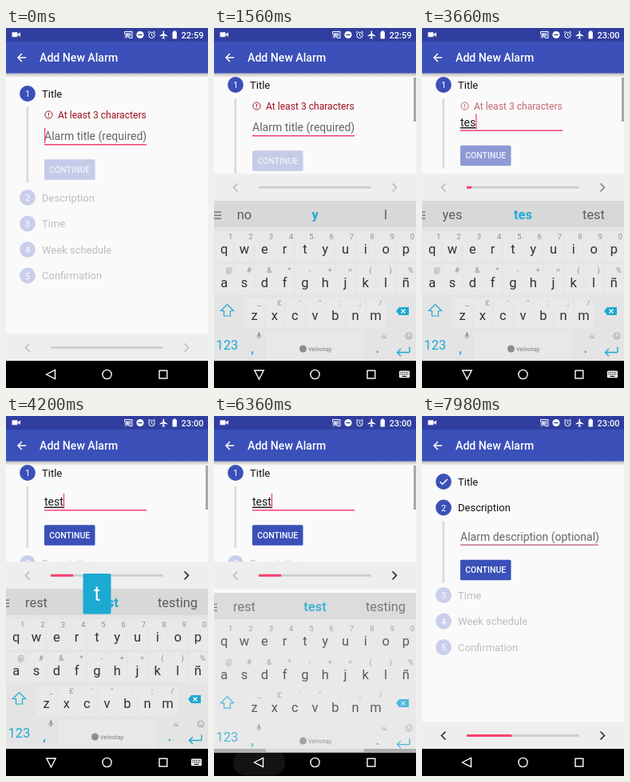
Recreate the animation shown at these times as an HTML page with a canvas. Size 253 by 450 pixels, loop 8000 ms.

```html
<!DOCTYPE html>
<html lang="en">
<head>
<meta charset="utf-8">
<title>Add New Alarm</title>
<style>
html, body { margin: 0; overflow: hidden; background: #000; }
canvas { display: block; }
</style>
</head>
<body>
<canvas id="stage" width="253" height="450"></canvas>
<script>
const ctx = document.getElementById('stage').getContext('2d');
const BLUE = '#3b50b8', PINK = '#f73f6e', CYAN = '#1ca9d2', RED = '#a00f1e', PAGE = '#fafafa';
const LOOP = 8000;

// Typed text and suggestions, from the given time on.
const typing = [
  { at: 0, text: '', hints: ['no', 'y', 'I'] },
  { at: 2520, text: 't', hints: ['the', 't', 'to'] },
  { at: 3060, text: 'te', hints: ['the', 'te', 'team'] },
  { at: 3540, text: 'tes', hints: ['yes', 'tes', 'test'] },
  { at: 4140, text: 'test', hints: ['rest', 'test', 'testing'] },
];
// Key popups: letter, key centre, top, start, end.
const popups = [
  ['t', 114, 197, 2400, 2580], ['e', 63.5, 197, 2940, 3120],
  ['s', 38, 238, 3420, 3600], ['t', 114, 197, 4020, 4260],
];
const steps = ['Title', 'Description', 'Time', 'Week schedule', 'Confirmation'];

const lerp = (a, b, k) => a + (b - a) * k;
const ramp = (t, a, b) => Math.min(1, Math.max(0, (t - a) / (b - a)));
const ease = (t, a, b) => { const k = ramp(t, a, b); return k * k * (3 - 2 * k); };

function rect(x, y, w, h, color, radius = 0) {
  ctx.fillStyle = color;
  ctx.beginPath();
  ctx.roundRect(x, y, w, h, radius);
  ctx.fill();
}
function disc(x, y, r, color) {
  ctx.fillStyle = color;
  ctx.beginPath();
  ctx.arc(x, y, r, 0, 7);
  ctx.fill();
}
function ring(x, y, r, color, width) {
  ctx.strokeStyle = color;
  ctx.lineWidth = width;
  ctx.beginPath();
  ctx.arc(x, y, r, 0, 7);
  ctx.stroke();
}
// Path data drawn at (x, y): stroked with a width, otherwise filled.
function path(d, x, y, color, width, angle = 0) {
  ctx.save();
  ctx.translate(x, y);
  ctx.rotate(angle);
  ctx.fillStyle = ctx.strokeStyle = color;
  ctx.lineWidth = width;
  if (width) ctx.stroke(new Path2D(d)); else ctx.fill(new Path2D(d));
  ctx.restore();
}
function text(s, x, y, size, color, align = 'left', weight = 400) {
  ctx.font = `${weight} ${size}px Roboto, sans-serif`;
  ctx.textAlign = align;
  ctx.fillStyle = color;
  ctx.fillText(s, x, y);
}
function layer(alpha, draw) {
  if (alpha <= 0) return;
  ctx.save();
  ctx.globalAlpha *= alpha;
  draw();
  ctx.restore();
}
function clipped(x, y, w, h, draw) {
  ctx.save();
  ctx.beginPath();
  ctx.rect(x, y, w, h);
  ctx.clip();
  draw();
  ctx.restore();
}

function statusBar(t) {
  rect(0, 0, 253, 17, '#303f9f');
  rect(7.5, 5.2, 7, 6, '#fff', .8);
  path('M0 0L4 -2.8V2.8Z', 14, 8.2, '#fff');
  rect(150, 6, 6.5, 5, 'rgba(255,255,255,.6)');
  path('M-4.5 -1.5V-4H5V4H1M-4.5 3.8h1M-4.5 1.2q2.6 0 2.8 2.8M-4.5 -.8q4.6 0 4.8 4.8', 153, 8.5, '#fff', 1);
  disc(168, 8.5, 4.6, '#fff');
  rect(165.4, 7.8, 5.2, 1.4, '#303f9f');
  ring(182.5, 9, 3.7, '#fff', 1);
  path('M0 -2V.4L1.7 1.4M-4.6 -3.2L-2.4 -5M4.6 -3.2L2.4 -5', 182.5, 9, '#fff', 1);
  path('M-.8 -4.5Q0 -5.5 .8 -4.5V-1.5L4.7 1V2.2L.8 1V3.5L2 4.5V5.3L0 4.7L-2 5.3V4.5L-.8 3.5V1L-4.7 2.2V1L-.8 -1.5Z', 197.3, 8.4, '#fff');
  rect(208.5, 4.5, 5.4, 9, '#fff', .6);
  rect(210, 3.4, 2.4, 1.5, '#fff');
  text(t < 2400 ? '22:59' : '23:00', 247.5, 12.5, 11, '#fff', 'right', 500);
}

function appBar() {
  const shade = ctx.createLinearGradient(0, 56, 0, 62);
  shade.addColorStop(0, 'rgba(0,0,0,.28)');
  shade.addColorStop(1, 'rgba(0,0,0,0)');
  rect(0, 56, 253, 6, shade);
  rect(0, 17, 253, 39.5, BLUE);
  path('M5.3 0H-5M0 -5L-5 0L0 5', 20, 37, '#fff', 1.5);
  text('Add New Alarm', 42, 42, 14.1, '#fff', 'left', 500);
}

function header(i, y, active, done) {
  layer(lerp(.26, 1, active), () => {
    disc(27, y, 9.9, BLUE);
    text(steps[i], 45, y + 4.5, 13, '#111');
  });
  if (done) path('M-4.5 .3L-1.4 3.3L4.8 -3', 27, y, '#fff', 1.5);
  else text(i + 1, 27, y + 4, 11, '#fff', 'center');
}

function button(y, enabled, press = 0) {
  layer(lerp(.28, 1, enabled), () => rect(48, y - 12.8, 63.5, 25.5, BLUE, 1.5));
  if (press > 0 && press < 1) clipped(48, y - 12.8, 63.5, 25.5, () =>
    disc(80, y, 40 * press, `rgba(255,255,255,${.35 * (1 - press)})`));
  text('CONTINUE', 79.7, y + 3.8, 10.5, `rgba(255,255,255,${lerp(.75, 1, enabled)})`, 'center', 500);
}

function titleForm(y, t, error, typed) {
  layer(error, () => {
    ring(53.5, y + 26.5, 4.6, RED, 1);
    rect(53, y + 24, 1, 3.2, RED);
    rect(53, y + 28.2, 1, 1, RED);
    text('At least 3 characters', 65, y + 31, 12.1, RED);
  });
  const base = y + 41 + 17 * error;
  ctx.font = '400 14px Roboto, sans-serif';
  const width = ctx.measureText(typed.text).width;
  if (typed.text) {
    text(typed.text, 48, base, 14, '#1c1c1c');
    rect(48, base + 1.5, width, 1.4, '#1c1c1c');
  } else text('Alarm title (required)', 48, base, 14, '#666');
  const caret = typed.text
    ? t > 6300 || Math.max(0, t - typed.at - 80) % 1000 < 500
    : t < 180 || (t > 720 && t < 1200);
  if (caret) rect(48 + width, base - 15, 1.3, 19, PINK);
  rect(48, base + 5, 128, 1.4, PINK);
  button(y + 78 + 17 * error, 1 - error, ramp(t, 6840, 7050));
}

function descriptionForm(y) {
  text('Alarm description (optional)', 48, y + 41, 14, '#666');
  rect(48, y + 46, 173, 1.3, '#b9587d');
  button(y + 78, 1);
}

function scrollbarAlpha(t) {
  if (t < 2300) return ease(t, 1320, 1440) - ramp(t, 2040, 2160);
  if (t < 5700) return ramp(t, 2520, 2580) - ramp(t, 4920, 5100);
  return t < 6450 ? ramp(t, 6150, 6210) : 0;
}

function stepper(t, bottom, typed) {
  const error = 1 - ease(t, 3560, 3800);
  const next = ease(t, 6880, 7160);
  const scroll = t < 6450 ? 11 * ease(t, 1260, 1440) : 0;
  clipped(0, 56, 253, bottom - 56, () => {
    let y = 82 - scroll;
    steps.forEach((_, i) => {
      const open = i === 0 ? 1 - next : i === 1 ? next : 0;
      const extra = i === 0 ? 17 * error : 0;
      const gap = lerp(32.5, (i === 0 ? 113 : 109.5) + extra, open);
      header(i, y, i === 0 ? 1 : open, i === 0 && t > 6900);
      if (open) clipped(0, y + 14, 253, Math.max(0, gap - 25), () => layer(open, () => {
        rect(25.3, y + 17, 3, 77 + extra, '#dcdcdc');
        if (i === 0) titleForm(y, t, error, typed);
        else descriptionForm(y);
      }));
      y += gap;
    });
    layer(scrollbarAlpha(t), () => rect(250, 62, 3, 55, '#a8a8a8'));
  });

  rect(0, bottom, 253, 34, '#eeeeee');
  const mid = bottom + 17;
  const arrow = (x, side, on) => path(`M${-2.5 * side} -5L${2.5 * side} 0L${-2.5 * side} 5`,
    x, mid, `rgba(50,50,50,${lerp(.25, 1, on)})`, 1.7);
  arrow(27, -1, next);
  arrow(226, 1, 1 - error);
  rect(56, mid - 1.5, 141, 3, '#cfcfcf');
  rect(56, mid - 1.5, 141 * .2 * (ease(t, 3560, 3900) + next), 3, PINK);
}

function keyRow(letters, hints, x, y, hintX, hintY) {
  [...letters].forEach((letter, i) => {
    const cx = x + 25.3 * i;
    rect(cx - 12, y - 23, 24, 38, '#e9e9e9', 2);
    text(letter, cx, y + 5, 16.5, '#303030', 'center');
    text(hints[i], cx + hintX, hintY + 3.5, 9.5, '#8d8d8d', 'center');
  });
}

function keyboard(hints) {
  rect(0, 216, 253, 200, '#e4e4e4');
  rect(0, 216, 253, 33, '#d8d8d8');
  for (const y of [229.5, 233.5, 237.5]) rect(0, y, hints[1] === 'y' ? 9 : 4, 1.3, '#666');
  text(hints[0], 38, 238.5, 16.4, '#5c5c5c', 'center');
  text(hints[1], 126.5, 238.5, 16.4, CYAN, 'center', 700);
  text(hints[2], 215, 238.5, 16.4, '#5c5c5c', 'center');

  keyRow('qwertyuiop', '1234567890', 12.7, 277, 8, 260);
  keyRow('asdfghjklñ', '@#&*-+=()%', 12.7, 318.5, 6, 302);
  keyRow('zxcvbnm', '_£\'":;/', 50.6, 360, 6, 343);

  path('M0 -7.5L8 .5H4V7H-4V.5H-8Z', 16.5, 353, CYAN, 1.2);
  path('M-8 0L-4 -5H8V5H-4Z', 236, 354, CYAN);
  path('M-2 -2.5L3 2.5M3 -2.5L-2 2.5', 236.5, 354, '#fff', 1.2);

  rect(65, 379, 123, 36, '#e8e8e8', 2);
  text('123', 2.5, 401.5, 16.5, CYAN);
  text(',', 48, 406, 17, CYAN, 'center', 500);
  text('.', 205, 406, 15, CYAN, 'center', 700);
  rect(55, 380.5, 2.4, 5, '#8d8d8d', 1.2);
  path('M-2.5 -1Q-2.5 2 0 2T2.5 -1M0 2V4', 56.2, 385, '#8d8d8d', .8);
  disc(111.5, 401, 4.5, '#8d8d8d');
  text('Velnotap', 118, 404, 7.5, '#7c7c7c');
  text('.¡¿', 212.5, 387, 8, '#8d8d8d', 'center');
  ring(244, 385, 4, '#8d8d8d', .8);
  path('M-2 .8Q0 3 2 .8M-1.5 -1.5v1M1.5 -1.5v1', 244, 385, '#8d8d8d', .8);
  path('M8 -6V0Q8 1 7 1H-7M-3 -3.5L-7.5 1L-3 5.5', 237, 404.5, CYAN, 1.4);
}

function navBar(t) {
  rect(0, 416, 253, 34, '#000');
  const grow = ease(t, 5400, 5640);
  layer(grow * (1 - ramp(t, 6270, 6430)), () =>
    rect(56.5 - 32.5 * grow, 416.5, 65 * grow, 33, '#2c2c2c', 16));
  const turn = ease(t, 1200, 1380) - ease(t, 6150, 6330);
  path('M-6 0L5 -5.7V5.7Z', 56.5, 433, '#fff', 1.4, -turn * Math.PI / 2);
  ring(126.5, 433, 5.6, '#fff', 1.4);
  ctx.lineWidth = 1.4;
  ctx.strokeRect(192, 428.2, 9.8, 9.8);
  if (t > 1260 && t < 6330) {
    rect(232, 428.5, 13, 8.8, '#fff', 1);
    for (let i = 0; i < 10; i++) rect(233.4 + i % 5 * 2.2, i < 5 ? 430 : 432.3, 1.2, 1.2, '#000');
    rect(235.5, 434.8, 6, 1.2, '#000');
  }
}

function draw(t) {
  const typed = typing.findLast(state => t >= state.at);
  const shown = ease(t, 1200, 1440) - ramp(t, 6250, 6480) ** 2;
  rect(0, 0, 253, 450, PAGE);
  stepper(t, t >= 1260 && t < 6450 ? 182.3 : 382.5, typed);
  appBar();
  statusBar(t);
  navBar(t);
  layer(shown, () => {
    ctx.translate(0, 22 * (1 - shown));
    keyboard(typed.hints);
  });
  for (const [letter, x, y, from, to] of popups) {
    if (t < from || t >= to) continue;
    rect(x - 17.5, y, 35, 50.5, CYAN, 2);
    text(letter, x, y + 34, 25, '#fff', 'center');
  }
}

const start = performance.now();
function tick() {
  draw((performance.now() - start) % LOOP);
  requestAnimationFrame(tick);
}
tick();
</script>
</body>
</html>
```
